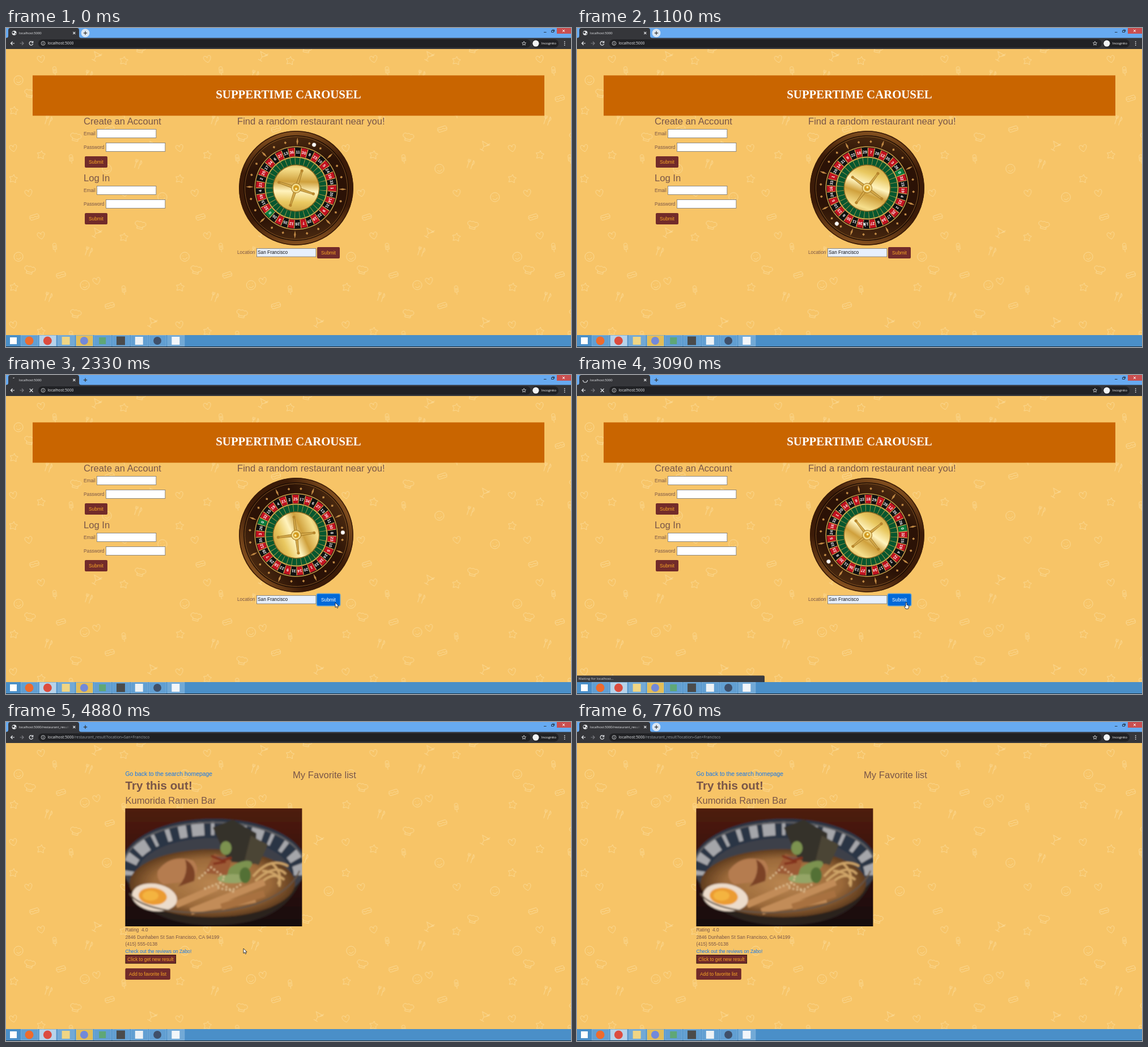
These frames come from a looping animation (997 px wide and 562 px high, 7860 ms). An HTML page:

```html
<!DOCTYPE html>
<html lang="en">
<head>
<meta charset="utf-8">
<title>Restaurant picker</title>
<style>
html, body { margin: 0; width: 100%; height: 100%; overflow: hidden; }
svg { display: block; font: 8.32px "Liberation Sans", Arial, sans-serif; }
text { white-space: pre; }
.ui { font-family: "Open Sans", "Noto Sans", sans-serif; }
.page { fill: #795548; }
.page .h2 { font-size: 16.64px; }
.field { fill: #fff; stroke: #767676; stroke-width: .8; }
.btn { fill: #722b2a; }
.label { fill: #f9a825; }
.link { fill: #1478ee; }
.line { fill: none; stroke: #e8eaed; stroke-width: 1.2; }
</style>
</head>
<body>
<svg width="997" height="562" viewBox="0 0 997 562">
  <defs>
    <pattern id="food" width="293.4" height="311" patternUnits="userSpaceOnUse"></pattern>
    <linearGradient id="fade" gradientUnits="userSpaceOnUse" x1="100" x2="113" y1="0" y2="0">
      <stop stop-color="#e8eaed"/><stop offset="1" stop-color="#e8eaed" stop-opacity="0"/>
    </linearGradient>
    <linearGradient id="wood" gradientUnits="userSpaceOnUse" x1="-82" y1="-57" x2="82" y2="57">
      <stop stop-color="#84501f"/><stop offset=".28" stop-color="#3c1b08"/>
      <stop offset=".7" stop-color="#3c1b08"/><stop offset="1" stop-color="#84501f"/>
    </linearGradient>
    <linearGradient id="gold" x2="1" y2="1">
      <stop stop-color="#b98a2c"/><stop offset=".28" stop-color="#e9c860"/><stop offset=".45" stop-color="#fff3bd"/>
      <stop offset=".6" stop-color="#cfa03c"/><stop offset=".8" stop-color="#f6df8c"/><stop offset="1" stop-color="#b07d22"/>
    </linearGradient>
    <linearGradient id="wall" x2="0" y2="1">
      <stop stop-color="#4f1c0b"/><stop offset=".35" stop-color="#3d150b"/><stop offset="1" stop-color="#140c0b"/>
    </linearGradient>
    <radialGradient id="broth">
      <stop stop-color="#b98550"/><stop offset=".7" stop-color="#9c6a3a"/><stop offset="1" stop-color="#5f3c1e"/>
    </radialGradient>
    <clipPath id="frame"><rect x="210.4" y="152.2" width="312" height="207.800"/></clipPath>
    <filter id="soft"><feGaussianBlur stdDeviation="1.5"/></filter>
  </defs>

  <rect width="997" height="562" fill="#f7c467"/>
  <rect y="37" width="997" height="504" fill="url(#food)"/>

  <g id="home" class="page">
    <rect x="47" y="83.5" width="903" height="71" fill="#c96500"/>
    <text x="498.5" y="124" text-anchor="middle" fill="#fff" style="font:bold 20.8px 'Liberation Serif',serif">SUPPERTIME CAROUSEL</text>
    <text class="h2" x="137" y="170">Create an Account</text>
    <text class="h2" x="137" y="270">Log In</text>
    <text class="h2" x="408" y="170">Find a random restaurant near you!</text>
    <g id="forms"></g>
    <text x="408" y="398">Location</text>
    <rect class="field" x="442.4" y="388.4" width="104.5" height="14.6" style="fill:#e8f0fe"/>
    <text x="444" y="398" fill="#111">San Francisco</text>
    <rect id="ring" x="547.5" y="384.5" width="43" height="23" rx="3.5" fill="#5f9fd0"/>
    <rect id="go" x="549" y="386" width="40" height="20" rx="2"/>
    <text id="goText" x="569" y="398.8" text-anchor="middle">Submit</text>
    <g id="wheel"></g>
  </g>

  <g id="result" class="page">
    <text class="link" x="210.4" y="95" font-size="10.4">Go back to the search homepage</text>
    <text x="210.4" y="119" font-size="20.7" font-weight="bold">Try this out!</text>
    <text class="h2" x="210.4" y="144">Kumorida Ramen Bar</text>
    <text class="h2" x="506" y="99">My Favorite list</text>
    <g clip-path="url(#frame)"><g filter="url(#soft)">
      <rect x="205" y="147" width="322" height="218" fill="url(#wall)"/>
      <path d="M204 240C210 320 270 358 366 358S520 322 530 240Z" fill="#29211d"/>
      <ellipse cx="367" cy="254" rx="162" ry="78" fill="#3d4048"/>
      <g fill="none">
        <path d="M214 270C216 160 518 160 520 270" stroke="#2c3444" stroke-width="34"/>
        <path d="M214 270C216 160 518 160 520 270" stroke="#a5a6aa" stroke-width="24" stroke-dasharray="8 15 14 9 22 12 6 19"/>
        <path d="M206 252C226 152 506 152 528 252" stroke="#5b5c60" stroke-width="3"/>
      </g>
      <ellipse cx="364" cy="284" rx="146" ry="60" fill="url(#broth)"/>
      <path d="M365 186L400 172 442 196 438 250 392 246Z" fill="#35302a"/>
      <path d="M432 200l30 16-16 36-25-8Z" fill="#4b4434"/>
      <path d="M268 262q22-30 62-18 16 18-4 36l-48 6q-14-8-10-24Z" fill="#b57b50"/>
      <path d="M316 242q22 12 16 38l-28 10q20-22 12-48Z" fill="#7b4325"/>
      <path d="M436 272q30-36 62-18M440 280q36-32 54-12M445 288q26-28 46-10M452 262q38 4 30 28M468 248q22 18 12 38"
        fill="none" stroke="#cfa468" stroke-width="4"/>
      <g stroke="#c28c58" stroke-width="12">
        <path d="M300 322L372 291M326 334L456 282M335 330L440 312"/>
        <path d="M380 326L456 302" stroke="#a8713f"/>
      </g>
      <g fill="#7b9250">
        <ellipse cx="388" cy="222" rx="10" ry="12"/><ellipse cx="412" cy="258" rx="24" ry="10" transform="rotate(-25 412 258)"/>
        <ellipse cx="400" cy="276" rx="27" ry="8" fill="#94a566"/><ellipse cx="422" cy="270" rx="10" ry="14" fill="#536f35"/>
      </g>
      <path d="M350 266l18-34 30 12-8 26Z" fill="#9c5a34"/>
      <path d="M362 236l20 8 16-5M366 250l22-4" stroke="#83301a" stroke-width="4"/>
      <path d="M340 276l22-20 24 18-14 18 26 5 20-13M350 294l28-11 26 18" fill="none" stroke="#e3c496" stroke-width="3" stroke-dasharray="3 4"/>
      <ellipse cx="262" cy="309" rx="40" ry="24" fill="#ecdccb" transform="rotate(9 262 309)"/>
      <ellipse cx="259" cy="307" rx="25" ry="15" fill="#eb9c30" transform="rotate(6 259 307)"/>
      <ellipse cx="255" cy="306" rx="14" ry="9" fill="#f4b440"/>
      <path d="M218 302C250 352 480 352 518 262" fill="none" stroke="#655546" stroke-width="2.5"/>
    </g></g>
    <text x="210.4" y="369">Rating  4.0</text>
    <text x="210.4" y="381.5">2846 Dunhaben St San Francisco, CA 94199</text>
    <text x="210.4" y="394">(415) 555-0138</text>
    <text class="link" x="210.4" y="406.5">Check out the reviews on Zabo!</text>
    <rect class="btn" x="211" y="410.5" width="88.6" height="14.6" stroke="#2c1010"/>
    <text class="label" x="214.3" y="420.6">Click to get new result</text>
    <rect class="btn" x="210.4" y="434" width="79.5" height="20" rx="2"/>
    <text class="label" x="217" y="446.6">Add to favorite list</text>
  </g>

  <g class="ui" fill="#e8eaed">
    <rect width="997" height="18" fill="#67aaf1"/>
    <path d="M0 17.5Q4 17.5 4 14V4Q4 0 8 0H125Q129 0 129 4V14Q129 17.5 133 17.5H997V37H0Z" fill="#35363a"/>
    <rect x="57" y="20" width="869" height="14.5" rx="7.2" fill="#202124"/>
    <g id="globe"><circle cx="14.5" cy="8.8" r="4"/><path d="M12 6l3 1-1 3-3-1ZM16 9l2 0-2 3Z" fill="#35363a"/></g>
    <circle id="spin" class="line" cx="14.5" cy="9" r="4" pathLength="100"/>
    <text id="tab" x="23" y="11" font-size="5.9" fill="url(#fade)"></text>
    <path class="line" d="M118.3 6.8l4 4m0-4l-4 4"/>
    <circle id="hover" cx="140" cy="8.8" r="7.4" fill="#dbe7f3"/>
    <path d="M136.8 8.8h6.4M140 5.6v6.4" stroke="#333" stroke-width="1.2"/>
    <path class="line" d="M15 27H8.5m3-3l-3 3 3 3"/>
    <path class="line" d="M24.5 27H31m-3-3l3 3-3 3" style="stroke:#7b7c80"/>
    <path id="reload" class="line" d="M47 25a3.3 3.3 0 1 0 .6 2.8M47.6 23v3h-3"/>
    <path id="stop" class="line" d="M41.7 24.2l5.8 5.8m0-5.8l-5.8 5.8"/>
    <circle class="line" cx="65.5" cy="27" r="3.4" style="stroke-width:.8"/>
    <path class="line" d="M65.5 26.5v2.3M65.5 24.8v.9" style="stroke-width:.9"/>
    <text x="73.6" y="29.4" font-size="6.8">localhost:5000<tspan id="path" fill="#9aa0a6"></tspan></text>
    <path class="line" d="M914 23.6l1 2.3 2.5.2-1.9 1.7.6 2.4-2.2-1.3-2.2 1.3.6-2.4-1.9-1.7 2.5-.2Z" style="stroke-width:.8"/>
    <rect x="928" y="20" width="47" height="14.5" rx="7.2" fill="#202124"/>
    <circle cx="934.8" cy="27.2" r="5.6" fill="#f1f3f4"/>
    <text x="944.8" y="29.4" font-size="6" fill="#fff">Incognito</text>
    <path d="M985.7 23.5v8" stroke="#e8eaed" stroke-width="1.5" stroke-dasharray="1.5 1.5"/>
    <path d="M949 7.5h4.5M962.5 4.5h4v3h-4ZM963.5 3.2h4v3" fill="none" stroke="#27394c"/>
    <rect x="972" width="25" height="10" fill="#c94f50"/>
    <path d="M982 3l4 4m0-4l-4 4" stroke="#fff"/>
  </g>

  <g id="status" class="ui">
    <path d="M0 529.5H329q2 0 2 2V541H0Z" fill="#3a3b3f"/>
    <text x="2.5" y="537.3" font-size="6" fill="#d5d7da">Waiting for localhost...</text>
  </g>
  <g id="taskbar"></g>
  <path id="arrow" d="M0 0V8.5L2 6.7 3.4 9.7 4.9 9 3.6 6.1H6.2Z" fill="#fff" stroke="#111" stroke-width=".8"/>
  <path id="hand" d="M-1 0Q0-1 1 0V4L4.5 5V8L3.5 11H-1L-3.5 7-2.8 6-1 7Z" fill="#fff" stroke="#111" stroke-width=".8"/>
</svg>
<script>
const $ = id => document.getElementById(id);
const show = (id, on) => { $(id).style.display = on ? "" : "none"; };
const times = (n, fn) => Array.from({ length: n }, (_, i) => fn(i)).join("");

// Wallpaper: [outline, tilt, x, y, x, y, ...]
const icons = [
  ["M0 6C-9 0-7-7-3-6Q0-5 0-2Q0-5 3-6C7-7 9 0 0 6Z", -12, 62, 55, 160, 135, 13, 212, 209, 291, 40, 291],
  ["M0-7L2-3 7-2 4 2 5 7 0 5-5 7-4 2-7-2-2-3Z", 8, 208, 57, 14, 145, 62, 223, 13, 265],
  ["M-8 0a8 8 0 1 0 16 0a8 8 0 1 0-16 0M-3-3v1M3-3v1M-4 2q4 5 8 0", -15, 22, 92, 139, 142, 178, 248, 276, 298],
  ["M-4-8V8M-6-8v4q2 3 4 0v-4M3 8V-8q5 4 0 9", 18, 146, 83, 75, 163, 233, 240],
  ["M-7-6H7L0 1ZM0 1V8M-4 8H4M3-3L7-9", 30, 159, 50, 257, 208],
  ["M-5 2a4 4 0 1 1 2-7a4 4 0 0 1 6 0a4 4 0 1 1 2 7V7H-5ZM-5 4H5", 12, 42, 115, 123, 192, 237, 36],
  ["M-7-4H7q3 4 0 8H-7q-3-4 0-8M-8 0l3-1 3 2 3-2 3 2 4-1", -18, 97, 124, 183, 178, 50, 22],
  ["M-3 4V-4a3 3 0 0 1 6 0V4ZM0 4V9M-1-3V2M1-3V2", -8, 86, 75, 208, 150, 115, 230],
];
$("food").innerHTML = '<g fill="none" stroke="#fbd993" stroke-width=".9">' + icons.map(([d, tilt, ...at]) =>
  times(at.length / 2, i => `<path d="${d}" transform="translate(${at[2 * i]} ${at[2 * i + 1]}) rotate(${tilt})"/>`)).join("") + "</g>";

$("forms").innerHTML = [0, 100].map(y => `<g transform="translate(0 ${y})">
  <text x="137" y="188.5">Email</text><rect class="field" x="160.4" y="178.4" width="104.5" height="15"/>
  <text x="137" y="212.5">Password</text><rect class="field" x="176.4" y="202.4" width="104.5" height="15"/>
  <rect class="btn" x="139" y="226" width="40" height="20" rx="2"/>
  <text class="label" x="159" y="238.8" text-anchor="middle">Submit</text></g>`).join("");

// Roulette wheel, centred on 0,0; hoops are measured in pockets
const numbers = [0, 32, 15, 19, 4, 21, 2, 25, 17, 34, 6, 27, 13, 36, 11, 30, 8, 23, 10, 5, 24, 16, 33, 1, 20, 14, 31, 9, 22, 18, 29, 7, 28, 12, 35, 3, 26];
const disc = (r, fill) => `<circle r="${r}" fill="${fill}"/>`;
const hoop = (r, width, color, dash = "none", offset = 0) =>
  `<circle r="${r}" fill="none" stroke="${color}" stroke-width="${width}" pathLength="37" stroke-dasharray="${dash}" stroke-dashoffset="${offset}"/>`;
$("wheel").innerHTML = disc(101, "url(#wood)") + hoop(100, 1.5, "#3a1c08") + hoop(92, 1.5, "#1c0c04")
  + hoop(82, 18, "#1a0a0480") + hoop(90.5, .8, "#8a5a26")
  + times(24, i => `<path d="${i % 3 ? "M0-84.5L2.3-82 0-79.5-2.3-82Z" : "M0-89L1.7-82 0-75-1.7-82Z"}" fill="#c28a45" transform="rotate(${i * 15})"/>`)
  + disc(73.5, "#c9a04a") + disc(72, "#111")
  + `<g transform="rotate(${-90 - 180 / 37})">` + hoop(63.5, 15, "#c1121f", "1 1", 1)
  + hoop(63.5, 15, "#0b7a3c", "1 36") + hoop(63.5, 15, "#d8b45c", ".1 .9", .05)
  + disc(55.5, "#d2aa4c") + disc(53.5, "#07572f") + hoop(47.5, 12, "#b89a45", ".1 .9", .05) + "</g>"
  + numbers.map((n, i) => `<text y="-61" font-size="7" font-weight="bold" fill="#fff" text-anchor="middle" transform="rotate(${i * 360 / 37})">${n}</text>`).join("")
  + disc(41.5, "#8d6a22") + disc(40, "url(#gold)")
  + times(4, i => `<g transform="rotate(${62 + i * 90})"><path d="M-2.5 0L-1.3-31H1.3L2.5 0Z" fill="#d3a848" stroke="#94691c" stroke-width=".7"/><circle cy="-32" r="2.6" fill="#b8862c"/></g>`)
  + disc(9, "#a87820") + disc(8, "#f0d98a") + disc(5, "#d39a1e") + '<circle cx="-1" cy="-1" r="2" fill="#ffe9a0"/>'
  + '<g transform="rotate(156)"><circle cy="-82.5" r="3.7" fill="#b9aea6"/><circle cy="-82.5" r="3" fill="#fff"/></g>';

// Taskbar: [round, colour, size, button colour]
const apps = [[1, "#ee6b2d", 15, "#629fd2"], [1, "#dc4c3f", 15, "#b8d3e9"], [0, "#f0d584", 14, "#72a9d6"],
  [1, "#7289da", 14, "#e3bd58"], [0, "#5fa777", 12, "#629fd2"], [0, "#4b4b4b", 15, "#629fd2"],
  [0, "#eef2f5", 14, "#629fd2"], [1, "#40506a", 14, "#629fd2"], [0, "#f2f6fa", 14, "#72a9d6"]];
$("taskbar").innerHTML = '<rect y="541" width="997" height="21" fill="#4a8fc8"/><rect y="561" width="997" height="1" fill="#1d2c3a"/><rect x="7" y="545" width="12" height="12" fill="#fff"/>'
  + apps.map(([round, color, size, back], i) => {
    const x = 41 + i * 32.3;
    return `<rect x="${x - 14.5}" y="541.5" width="30" height="19" fill="${back}" stroke="#85b5de" stroke-width=".7"/>
      <rect x="${x - size / 2}" y="${551 - size / 2}" width="${size}" height="${size}" rx="${round ? size / 2 : 0}" fill="${color}"/>`;
  }).join("");

const ticks = [0, 7760];
for (const [a, b, n] of [[100, 500, 5], [730, 1470, 9], [1570, 2330, 9], [2430, 3190, 9], [3280, 3940, 8], [4130, 4880, 9], [5880, 6170, 4]])
  for (let i = 0; i < n; i++) ticks.push(Math.floor((a + (b - a) * i / (n - 1)) / 10) * 10);
ticks.sort((a, b) => a - b);

// Linear interpolation through [time, ...values]
function track(t, keys) {
  const i = keys.findIndex(k => k[0] > t);
  if (i < 1) return (i ? keys.at(-1) : keys[0]).slice(1);
  const a = keys[i - 1], b = keys[i], f = (t - a[0]) / (b[0] - a[0]);
  return a.slice(1).map((v, j) => v + (b[j + 1] - v) * f);
}
const spinKeys = [[0, 226.5], [1100, 424.5], [2330, 650.9], [3090, 799.6], [3650, 900.4], [3940, 953]];
const mouseKeys = [[730, 75, 550], [1100, 505, 341], [1470, 535, 368], [2000, 581, 401], [4130, 581, 401],
  [4500, 490, 380], [4880, 419, 399], [5780, 419, 399], [5880, 300, 385], [6080, 9, 364]];
const loaderKeys = [[2240, -100, 5], [2330, -120, 9], [3090, -720, 50], [3650, -90, 72], [3940, 100, 75]];

function draw(now) {
  const t = now % 7860, s = ticks.findLast(k => k <= t);
  const done = s > 3800, loading = s > 2200 && !done, pressed = s > 2200, over = s > 1950;
  const moved = s > 3440, seen = s >= 730 && s < 6170, pointing = s > 2400 && !done;
  show("home", !done);
  show("result", done);
  show("globe", !loading);
  show("reload", !loading);
  show("spin", loading);
  show("stop", loading);
  show("hover", s < 1850 || s >= 7760);
  show("status", s > 2850 && s < 4220);
  show("ring", pressed);
  show("arrow", seen && !pointing);
  show("hand", seen && pointing);
  $("go").setAttribute("fill", over ? "#0069d9" : "#722b2a");
  $("goText").setAttribute("fill", over ? "#fff" : "#f9a825");
  $("path").textContent = moved ? "/restaurant_result?location=San+Francisco" : "";
  $("tab").textContent = "localhost:5000" + (moved ? "/restaurant_result?loc" : "");
  $("wheel").setAttribute("transform", `translate(512 282) rotate(${track(s, spinKeys)})`);
  const [turn, arc] = track(s, loaderKeys);
  $("spin").setAttribute("transform", `rotate(${turn} 14.5 9)`);
  $("spin").setAttribute("stroke-dasharray", `${arc} 100`);
  const place = `translate(${track(s, mouseKeys).join(" ")})`;
  $("arrow").setAttribute("transform", place);
  $("hand").setAttribute("transform", place);
}
function loop() {
  draw(performance.now());
  requestAnimationFrame(loop);
}
loop();
</script>
</body>
</html>
```
